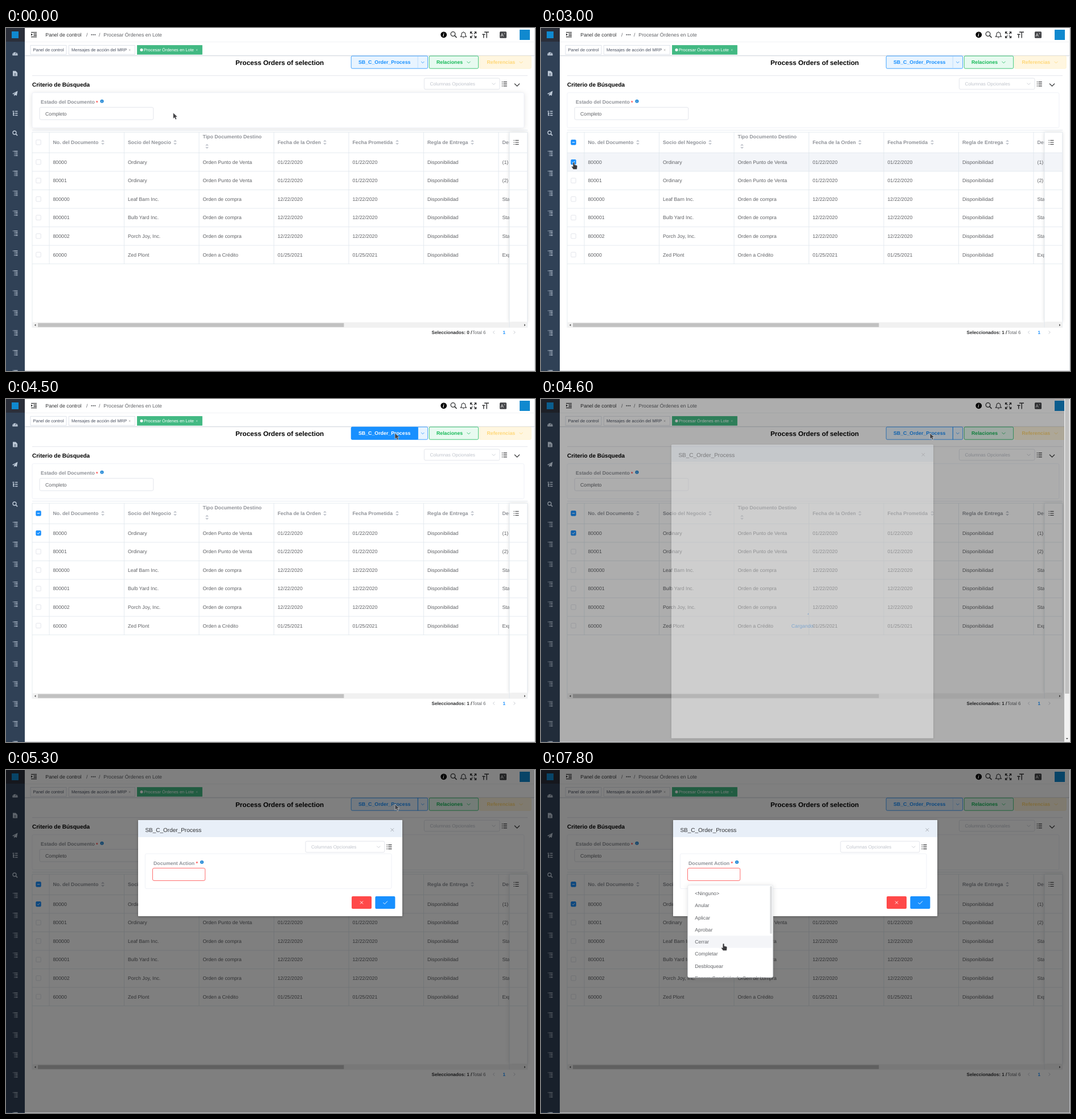
An HTML page for the animation above (8 s loop, 929 by 603 pixels).

```html
<!DOCTYPE html>
<html lang="es">
<head>
<meta charset="utf-8">
<title>Procesar Órdenes en Lote</title>
<style>
html, body { margin: 0; width: 100%; height: 100%; overflow: hidden; background: #fff; }
svg { display: block; width: 929px; height: 603px; }
text { font-family: "Liberation Sans", Arial, sans-serif; text-rendering: geometricPrecision; white-space: pre; }
.card { filter: drop-shadow(0 1px 4px rgba(0,0,0,.11)); }
.side { filter: drop-shadow(0 0 3px rgba(0,0,0,.14)); }
.dialog { filter: drop-shadow(0 1px 2px rgba(0,0,0,.3)); }
.menu { filter: drop-shadow(0 1px 4px rgba(0,0,0,.12)); }
</style>
</head>
<body>
<svg id="stage" viewBox="0 0 929 603" xmlns="http://www.w3.org/2000/svg"></svg>
<script>
const BLUE = '#1890ff', GREY = '#909399', BODY = '#606266', PALE = '#c0c4cc', LINE = '#dfe6ec';
const LOOP = 8000, STEP = 100;

// Drawing helpers; text is placed by its left edge and vertical centre.
const text = (x, y, s, fill = BODY, size = 8.75, bold = 0, more = '') =>
  `<text x="${x}" y="${y + size * .36}" font-size="${size}" fill="${fill}" ${bold ? 'font-weight="700"' : ''} ${more}>${s}</text>`;
const rect = (x, y, w, h, fill, stroke = 'none', r = 0, more = '') =>
  `<rect x="${x}" y="${y}" width="${w}" height="${h}" rx="${r}" fill="${fill}" stroke="${stroke}" stroke-width=".8" ${more}/>`;
const path = (d, stroke, w = .8, fill = 'none', more = '') =>
  `<path d="${d}" stroke="${stroke}" stroke-width="${w}" fill="${fill}" ${more}/>`;
const dot = (x, y, r, fill) => `<circle cx="${x}" cy="${y}" r="${r}" fill="${fill}"/>`;
const group = (id, s, more = '') => `<g id="${id}" ${more}>${s}</g>`;
const at = (x, y, s) => `<g transform="translate(${x} ${y})">${s}</g>`;
const chevron = (x, y, c, r = 3, w = .8) => path(`M${x - r} ${y - r / 2}l${r} ${r}l${r} ${-r}`, c, w);
const cross = (x, y, c, r, w = .7) => path(`M${x - r} ${y - r}l${2 * r} ${2 * r}M${x + r} ${y - r}l${-2 * r} ${2 * r}`, c, w);
const info = (x, y) => dot(x, y, 3, '#1682d4') + rect(x - .4, y - .5, .9, 2.2, '#fff') + dot(x, y - 1.5, .5, '#fff');
const menuIcon = (x, y, c = '#303133') =>
  path(`M${x - 4.5} ${y - 3.5}h1.4m1.3 0h6.3M${x - 4.5} ${y}h1.4m1.3 0h6.3M${x - 4.5} ${y + 3.5}h1.4m1.3 0h6.3`, c, 1.2);
const sorter = (x, y) => path(`M${x - 3} ${y - 1.2}l3 -3 3 3zM${x - 3} ${y + 1.2}l3 3 3 -3z`, 'none', 0, PALE);
const glass = (x, y, c, r) => `<circle cx="${x - 1}" cy="${y - 1}" r="${r}" fill="none" stroke="${c}" stroke-width="1.3"/>` +
  path(`M${x - 1 + r * .7} ${y - 1 + r * .7}l${r} ${r}`, c, 1.6);
const select = (x, y, w) => rect(x, y, w, 19.6, '#fff', '#dcdfe6', 2.5) +
  text(x + 10, y + 10, 'Columnas Opcionales', PALE, 8.125) + chevron(x + w - 10.5, y + 10, PALE);

function sidebar() {
  const c = '#bfcbd9';
  let s = rect(0, 0, 33, 603, '#304156') + rect(0, 0, 33, 24, '#2b2f3a') + rect(10, 6, 12, 12, '#1089cf');
  s += at(16, 45, path('M-4.6 3.2a4.7 4.7 0 1 1 9.2 0z', 'none', 0, c) + path('M0 1.5l1.8-3.5M-3 .5h1M2.4 .5h1', '#304156', .9));
  s += at(16, 80, path('M-4-4.5h5l3 3v6h-8z', 'none', 0, c) + path('M-2 .2h4M-2 2.4h4', '#304156', .8));
  s += at(16, 115, path('M-5 .5l9.5-5-1.6 8.6-3-1.3-1.6 2-.4-3 4-4.2-5 3.8z', 'none', 0, c));
  s += at(16, 150, path('M-4.5-3.5h3M0-3.5h4.5M-3-2v5.6h2M-3 0h2M0 0h4.5M0 3.6h4.5', c, 1.5));
  s += glass(16, 185, c, 3);
  for (let y = 220.5; y < 610; y += 35.05)
    s += at(16, y, path('M-4-3.9h1.2m.8 0h6.5M-1.6-1.3h1.2m.8 0h4.1M-1.6 1.3h1.2m.8 0h4.1M-1.6 3.9h1.2m.8 0h4.1', c, 1.1));
  return s;
}

function navbar() {
  const c = '#303133';
  let s = path('M33 24.5H929', '#eef0f2') + path('M33 48.4H929', '#d4d8e0', 1) + path('M33 49.4H929', '#f1f2f4', 1);
  s += path('M44 7.6h10M48.5 10.3h5.5M48.5 13h5.5M44 15.7h10', c, 1.3) + path('M44 9.5l3 2.1-3 2.1z', 'none', 0, c);
  s += text(69.3, 12, 'Panel de control', c) + text(141, 12, '/', BODY) + text(163, 12, '/', BODY);
  s += dot(150.4, 11.8, 1.1, BODY) + dot(153.4, 11.8, 1.1, BODY) + dot(156.4, 11.8, 1.1, BODY);
  s += text(171.3, 12, 'Procesar Órdenes en Lote');
  s += dot(768.7, 11.8, 5.4, '#000') + text(767, 12, 'i', '#fff', 9, 1, 'font-style="italic"');
  s += glass(786, 11.5, c, 3.8);
  s += path('M798.6 15.2h9.6q-1.5-1.4-1.5-4.4a3.3 3.3 0 0 0-6.6 0q0 3-1.5 4.4zM802.3 17h2.2M803.4 7.4v-1', c, 1.1);
  s += path('M815.6 10v-3h3M825.6 10v-3h-3M815.6 14v3h3M825.6 14v3h-3M816 7.4l3.3 3.3M825.2 7.4l-3.3 3.3M816 16.6l3.3-3.3M825.2 16.6l-3.3-3.3', c, 1.3);
  s += path('M840 7.2h8M844.2 7v10.6M836.4 11.2h5M838.8 11v6.6', c, 1.4);
  s += rect(867, 6.2, 12, 11.6, '#454649', 'none', 1.5) + text(868.5, 12.2, 'A', '#fff', 8) + text(874.6, 9.7, 'x', '#fff', 4.5);
  s += rect(902, 3, 18, 18, '#1089cf');
  const tab = (x, w, fill, edge) => rect(x, 30.6, w, 15.7, fill, edge);
  s += tab(43, 63, '#fff', '#d8dce5') + text(47.5, 38.6, 'Panel de control', '#495060', 7.5);
  s += tab(110.2, 116.4, '#fff', '#d8dce5') + text(115, 38.6, 'Mensajes de acción del MRP', '#495060', 7.5) + cross(217.2, 38.6, '#888', 1.3, .6);
  s += tab(230.4, 114, '#42b983', '#42b983') + dot(238, 38.4, 2.5, '#fff') +
    text(242, 38.6, 'Procesar Órdenes en Lote', '#fff', 7.5) + cross(335.2, 38.6, '#d5f0e4', 1.3, .6);
  return s;
}

function actions() {
  const name = 'SB_C_Order_Process';
  let s = text(403, 61.2, 'Process Orders of selection', '#000', 11.7, 1);
  s += rect(606.2, 49.2, 134.4, 22, '#e8f4ff', BLUE, 2) + path('M723.3 50V71', '#b5daff', .8);
  s += text(619, 60.2, name, BLUE, 8.8, 1) + chevron(731.8, 60.3, BLUE, 2.6);
  s += group('focus', path('M723.3 49V71.4', BLUE, 1));
  s += group('hot', rect(606, 49, 117.4, 22.4, BLUE, 'none', 2) + text(619, 60.2, name, '#fff', 8.8, 1));
  s += rect(743.2, 49.2, 86.4, 22, '#e7faf0', '#16b957', 2) + text(756, 60.2, 'Relaciones', '#16b957', 8.75, 1) + chevron(812.5, 60.3, '#16b957');
  s += rect(831.2, 49.2, 91, 22, '#fff6e0', '#fff1cc', 2) + text(844.5, 60.2, 'Referencias', '#ffd777', 8.75, 1) + chevron(904.5, 60.3, '#ffd777');
  return s + path('M46 83.7H916', '#dcdfe6');
}

function criteria() {
  return text(46, 99.3, 'Criterio de Búsqueda', '#000', 10, 1) + select(734.4, 88.2, 132.6) +
    menuIcon(875.3, 98.3) + chevron(897.5, 100, '#303133', 4.5, 1.1) +
    rect(46, 113.7, 863.8, 61.8, '#fff', '#ebeef5', 2.5, 'id="card"') +
    text(61, 130, 'Estado del Documento', GREY, 8.75, 1) + text(158, 130.6, '*', '#ff4949', 9, 1) + info(168.5, 128.8) +
    rect(59, 139.4, 199.8, 21.8, '#fff', '#dcdfe6', 2.5) + text(69, 150.4, 'Completo');
}

const ROW = 32.55, TOP = 219.4;
const COLS = [82.5, 214, 345.5, 477, 608.5, 740, 871.5];
const HEADS = ['No. del Documento', 'Socio del Negocio', 'Tipo Documento Destino', 'Fecha de la Orden', 'Fecha Prometida', 'Regla de Entrega', 'Des'];
const SORTS = [170, 297, 353, 560, 687, 819];
const ROWS = [
  ['80000', 'Ordinary', 'Orden Punto de Venta', '01/22/2020', '(1)'],
  ['80001', 'Ordinary', 'Orden Punto de Venta', '01/22/2020', '(2)'],
  ['800000', 'Leaf Barn Inc.', 'Orden de compra', '12/22/2020', 'Sta'],
  ['800001', 'Bulb Yard Inc.', 'Orden de compra', '12/22/2020', 'Sta'],
  ['800002', 'Porch Joy, Inc.', 'Orden de compra', '12/22/2020', 'Sta'],
  ['60000', 'Zed Plont', 'Orden a Crédito', '01/25/2021', 'Exp']
];

function table() {
  const box = (y, on) => rect(52.8, y - 4.2, 8.4, 8.4, on ? BLUE : '#fff', on ? BLUE : '#dcdfe6', 1.2);
  let s = rect(46, 0, 838, ROW, '#f3f5f9', 'none', 0, 'class="hover"') + box(201);
  HEADS.forEach((h, i) => {
    s += text(COLS[i], i == 2 ? 190.4 : 201.2, h, GREY, 8.75, 1);
    if (SORTS[i]) s += sorter(SORTS[i], i == 2 ? 208 : 201);
  });
  ROWS.forEach(([no, who, kind, date, note], r) => {
    const y = TOP + ROW * (r + .5);
    s += box(y);
    [no, who, kind, date, date, 'Disponibilidad', note].forEach((v, i) => s += text(COLS[i], y, v));
  });
  s += rect(884, 183.4, 31.6, 333, '#fff', 'none', 0, 'class="side"') + rect(884, 0, 31.6, ROW, '#f3f5f9', 'none', 0, 'class="hover"');
  s += menuIcon(896, 201);
  s += path('M46 179.6H916M46 183.2H916M46 526.6V183.2M915.6 183.2V526.6', LINE);
  for (let i = 0; i < 7; i++) s += path(`M46 ${TOP + ROW * i}H915.6M${COLS[i] - 6.5} 183.2V414.7`, LINE);
  s += rect(46.4, 517.4, 869, 9.4, '#f1f1f1') + rect(56, 518.7, 537.4, 7, '#c1c1c1');
  s += path('M52.4 520.2v4l-2.4-2zM910 520.2v4l2.4-2z', 'none', 0, '#505050') + path('M884 183.2V526.6', LINE);
  s += group('mark', box(201, 1) + path('M54.7 201h4.6', '#fff', 1.1) + box(235.7, 1) + path('M54.8 235.6l1.7 1.8 2.9-3.6', '#fff', 1));
  s += text(747.5, 535, 'Seleccionados: <tspan id="count">0</tspan> /', '#303133', 8.125, 1) + text(818.7, 535, 'Total 6', BODY, 8.125);
  s += path('M858 532.4l-2.6 2.6 2.6 2.6M891.6 532.4l2.6 2.6-2.6 2.6', PALE, .9) + text(872.5, 535, '1', BLUE, 8.125, 1);
  return s;
}

const header = (x, w) => path(`M${x} 118v-28q0-2 2-2h${w - 4}q2 0 2 2v28z`, 'none', 0, '#e8eff8') +
  text(x + 12.4, 105.4, 'SB_C_Order_Process', '#303133', 10) + cross(x + w - 17.7, 105.2, GREY, 2.8);

function dialogs() {
  const loading = rect(229, 88, 460, 516, '#fff', 'none', 1, 'class="dialog"') + header(229, 460) +
    path('', '#409eff', 1.2, 'none', 'id="arc" stroke-linecap="round"') + text(439.8, 406, 'Cargando', '#409eff');
  const bar = rect(919, 0, 10, 603, '#f1f1f1') + rect(920.2, 0, 7.4, 518, '#c1c1c1') + path('M921.8 596h4l-2 2.6z', 'none', 0, '#505050');
  const fields = select(526, 125.2, 138.8) + menuIcon(673, 135.2) +
    rect(244.4, 147.2, 432.6, 61.4, '#fff', '#ebeef5', 2.5) +
    text(259, 163.4, 'Document Action', GREY, 8.75, 1) + text(333.6, 164, '*', '#ff4949', 9, 1) + info(344, 162) +
    rect(257.5, 172.5, 92.2, 22, '#fff', '#ff4949', 2.5) +
    rect(607, 222, 35, 22, '#ff4949', 'none', 2) + cross(624.5, 233, '#fff', 2.5, .9) +
    rect(648.4, 222, 35, 22, BLUE, 'none', 2) + path('M662.4 233l2.6 2.7 5-5.2', '#fff', .9);
  return rect(0, 0, 928.2, 602.2, '#000', 'none', 0, 'id="shade"') + group('bar', bar) + group('loading', loading) +
    group('form', rect(232, 88, 464, 169, '#fff', 'none', 1, 'class="dialog"') + header(232, 464) + group('fields', fields));
}

function menu() {
  const items = ['&lt;Ninguno&gt;', 'Anular', 'Aplicar', 'Aprobar', 'Cerrar', 'Completar', 'Desbloquear', 'Espera Condición de Completar'];
  return rect(257.8, 202.4, 149.4, 162.4, '#fff', '#e4e7ed', 2.5, 'class="menu"') +
    rect(258.2, 0, 148.6, 21.3, '#f4f5f8', 'none', 0, 'id="pick"') +
    `<clipPath id="cut"><path d="M258 203h149v161.6h-149z"/></clipPath><g clip-path="url(#cut)">` +
    items.map((s, i) => text(270.2, 216.8 + 21.3 * i, s)).join('') + '</g>' +
    rect(402, 204, 3.8, 84, '#dedfe1', 'none', 1.9);
}

const pointers = group('cursor',
  path('M0 0V10.4L2.5 8.3 4.1 12 6.2 11.1 4.6 7.5 7.6 7.2Z', '#fff', .5, '#434347', 'id="arrow"') +
  path('M-1.4 1Q0-.8 1.4 1V4.4L5 5.2Q6.5 5.7 6.3 7.4L5.6 12.6H-.8L-3.6 8.4Q-4 6.8-2.6 7L-1.4 8Z', '#fff', .5, '#38383b', 'id="hand"'));

const $ = id => document.getElementById(id);
$('stage').innerHTML = rect(0, 0, 929, 603, '#fff') + path('M928.6 0V603M33 602.5H929', '#cfd2d6', .9) +
  sidebar() + navbar() + actions() + criteria() + table() + dialogs() + group('menu', menu()) + pointers;

// Pointer track: time, x, y.
const TRACK = [
  [0, 293.5, 149], [600, 293.5, 149], [1100, 150, 266], [1400, 100, 240], [1500, 100, 240], [2000, 76, 199],
  [2400, 65, 241], [2500, 58, 241], [2900, 58, 241], [3000, 57.5, 236], [3800, 729, 90], [4100, 683, 60],
  [5700, 683, 60], [6200, 325, 278], [6400, 293, 205], [6500, 293, 205], [7000, 322, 182], [7300, 322, 182],
  [7400, 320.5, 259], [7700, 320.5, 259], [7800, 320.5, 305], [LOOP, 320.5, 305]
];
const clamp = v => Math.max(0, Math.min(1, v));
const smooth = v => v * v * (3 - 2 * v);

// CSS "ease" timing curve, solved by bisection.
function ease(x) {
  x = clamp(x);
  let lo = 0, hi = 1, u = .5;
  for (let i = 0; i < 20; i++) {
    u = (lo + hi) / 2;
    if (.75 * u * (1 - u) + u ** 3 < x) lo = u; else hi = u;
  }
  return .3 * u * (1 - u) ** 2 + 3 * u * u * (1 - u) + u ** 3;
}

function pointer(t) {
  const i = TRACK.findIndex(k => k[0] > t);
  const [t0, x0, y0] = TRACK[i - 1], [t1, x1, y1] = TRACK[i];
  const p = smooth((t - t0) / (t1 - t0));
  return [x0 + (x1 - x0) * p, y0 + (y1 - y0) * p];
}

function spinner(t) {
  const age = t - 4545, p = smooth(clamp(age / 750)), rad = Math.PI / 180;
  const from = age * .18 + p * 115, to = from + 3 + p * 255;
  const spot = a => `${459 + 10.6 * Math.cos(a * rad)} ${382.6 + 10.6 * Math.sin(a * rad)}`;
  return `M${spot(from)}A10.6 10.6 0 ${to - from > 180 ? 1 : 0} 1 ${spot(to)}`;
}

const show = (id, on) => $(id).style.display = on ? '' : 'none';
const between = (t, a, b) => t >= a && t < b;

function render(t) {
  const [x, y] = pointer(t), page = t < 4600;
  const hand = between(t, 3000, 3100) || between(t, 4000, 4500) || t >= 6800;
  $('cursor').setAttribute('transform', `translate(${x} ${y})`);
  show('arrow', !hand);
  show('hand', hand);

  const row = Math.floor((y - TOP) / ROW), over = page && row >= 0 && row < 6;
  document.querySelectorAll('.hover').forEach(r => {
    r.style.display = over ? '' : 'none';
    r.setAttribute('y', TOP + ROW * row);
  });
  $('card').setAttribute('class', page && between(y, 113, 176) ? 'card' : '');
  show('mark', t >= 3000);
  $('count').textContent = t >= 3000 ? 1 : 0;
  show('hot', between(t, 4000, 4600));
  show('focus', between(t, 4000, 6600));

  const age = t - 4525, p = ease(age / 300);
  $('shade').setAttribute('opacity', .5 * ease(age / 200));
  show('bar', between(t, 4600, 5000));
  show('loading', between(t, 4600, 5000));
  $('loading').setAttribute('opacity', p);
  $('loading').setAttribute('transform', `translate(0 ${-12.5 * (1 - p)})`);
  if (between(t, 4600, 5000)) $('arc').setAttribute('d', spinner(t));
  show('form', t >= 5000);
  $('fields').setAttribute('opacity', .1 + .9 * ease((t - 5000) / 300));

  show('menu', t >= 7400);
  $('pick').setAttribute('y', 206.1 + 21.3 * Math.floor((y - 206.1) / 21.3));
}

const start = performance.now();
function tick() {
  const t = (performance.now() - start) % LOOP;
  render(Math.floor(t / STEP) * STEP);
  requestAnimationFrame(tick);
}
tick();
</script>
</body>
</html>
```
